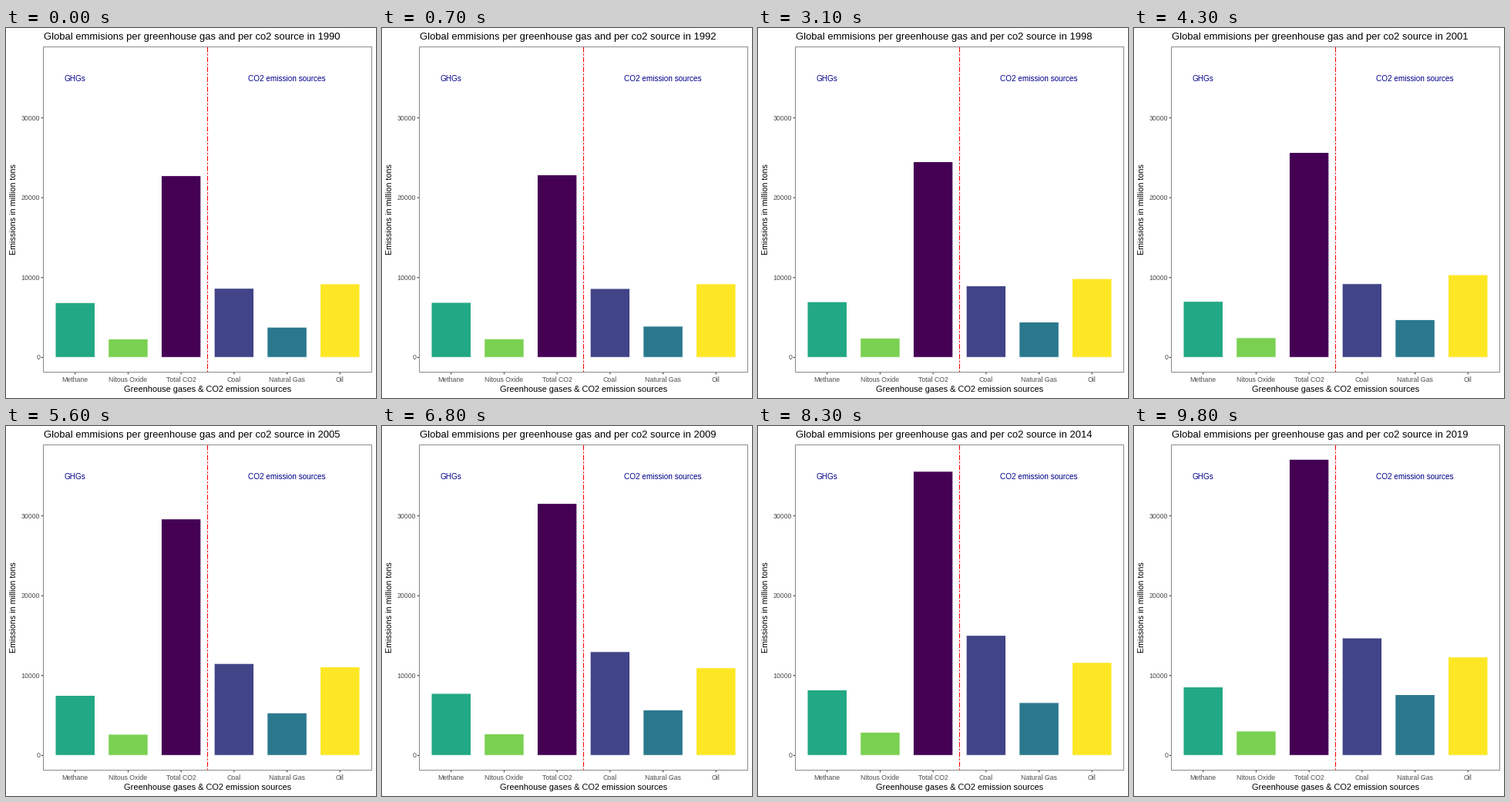
Recreate the animation shown at these times as a matplotlib script. Size 480x480 px, loop 10000 ms.

```python
import numpy as np
import matplotlib.pyplot as plt
from matplotlib.animation import FuncAnimation
from matplotlib.patches import Rectangle

plt.rcParams["font.family"] = "Liberation Sans"
plt.rcParams["path.snap"] = False

FRAMES, INTERVAL = 100, 100
LEFT, RIGHT, TOP, BOTTOM = 48.5, 474.5, 24.5, 446.5
ZERO, SCALE = 427.35, 0.01036
STEP = (RIGHT - LEFT) / 6.2

# Emissions in the key years; the years between are interpolated.
KEY_YEARS = [1990, 1994, 2001, 2005, 2009, 2014, 2019]
BARS = {
    "Methane": ("#22A884", [6865, 6915, 7020, 7520, 7765, 8215, 8575]),
    "Nitous Oxide": ("#7AD151", [2315, 2360, 2470, 2650, 2710, 2910, 3050]),
    "Total CO2": ("#440154", [22757, 22971, 25670, 29614, 31564, 35577, 37082]),
    "Coal": ("#414487", [8660, 8600, 9235, 11510, 12995, 15035, 14710]),
    "Natural Gas": ("#2A788E", [3790, 4040, 4735, 5330, 5705, 6615, 7615]),
    "Oil": ("#FDE725", [9215, 9220, 10360, 11095, 10980, 11645, 12325]),
}


def center(i):
    return LEFT + (0.6 + i) * STEP


def height_at(value):
    return ZERO - value * SCALE


def year_at(frame):
    """Each year rests, then one frame shows the half step to the next."""
    k = (frame - 2) / 4 if frame < 45 else 11 + (frame - 46) / 3
    return 1990 + (k + 0.5 if k == int(k) else np.floor(k) + 1)


fig = plt.figure(figsize=(480 / 72, 480 / 72), dpi=72, facecolor="white")
ax = fig.add_axes([0, 0, 1, 1])
ax.set(xlim=(0, 480), ylim=(480, 0))
ax.axis("off")


def label(x, y, text, size, color="black", ha="center", **kwargs):
    return ax.text(x, y, text, size=size, color=color, ha=ha,
                   va="baseline", zorder=4, **kwargs)


def line(xs, ys, color, **kwargs):
    ax.plot(xs, ys, color=color, lw=1.07, solid_capstyle="butt", **kwargs)


rects = []
for i, (name, (color, _)) in enumerate(BARS.items()):
    x = center(i)
    rect = Rectangle((x - 0.375 * STEP, ZERO), 0.75 * STEP, 0, facecolor=color,
                     edgecolor="white", lw=1.07, zorder=2)
    rects.append(ax.add_patch(rect))
    line([x, x], [BOTTOM, BOTTOM + 2.7], "#333333")
    label(x, 459, name, 8.8, "#4D4D4D")

for value in range(0, 40000, 10000):
    y = height_at(value)
    line([LEFT - 2.7, LEFT], [y, y], "#333333")
    label(44, y + 3, str(value), 8.8, "#4D4D4D", ha="right")

middle = (LEFT + RIGHT) / 2
line([middle, middle], [BOTTOM, TOP], "red", zorder=3,
     dashes=(2, 2, 6, 2), dash_capstyle="butt")
ax.add_patch(Rectangle((LEFT, TOP), RIGHT - LEFT, BOTTOM - TOP, fill=False,
                       edgecolor="#8C8C8C", lw=1, zorder=3))

label(center(0), 69, "GHGs", 10, "#00008B")
label(center(4), 69, "CO2 emission sources", 10.05, "#00008B")
label(middle + 0.5, 472, "Greenhouse gases & CO2 emission sources", 10.95)
label(13, (TOP + BOTTOM) / 2, "Emissions in million tons", 10.6,
      rotation=90, rotation_mode="anchor")
title = label(49, 15, "", 13, ha="left")


def update(frame):
    year = year_at(frame)
    for rect, (_, values) in zip(rects, BARS.values()):
        top = height_at(np.interp(year, KEY_YEARS, values))
        rect.set_y(top)
        rect.set_height(ZERO - top)
    title.set_text("Global emmisions per greenhouse gas and per co2 source in "
                   f"{int(year)}")
    return [*rects, title]


anim = FuncAnimation(fig, update, frames=FRAMES, interval=INTERVAL,
                     repeat=True, repeat_delay=0)
plt.show()
```
